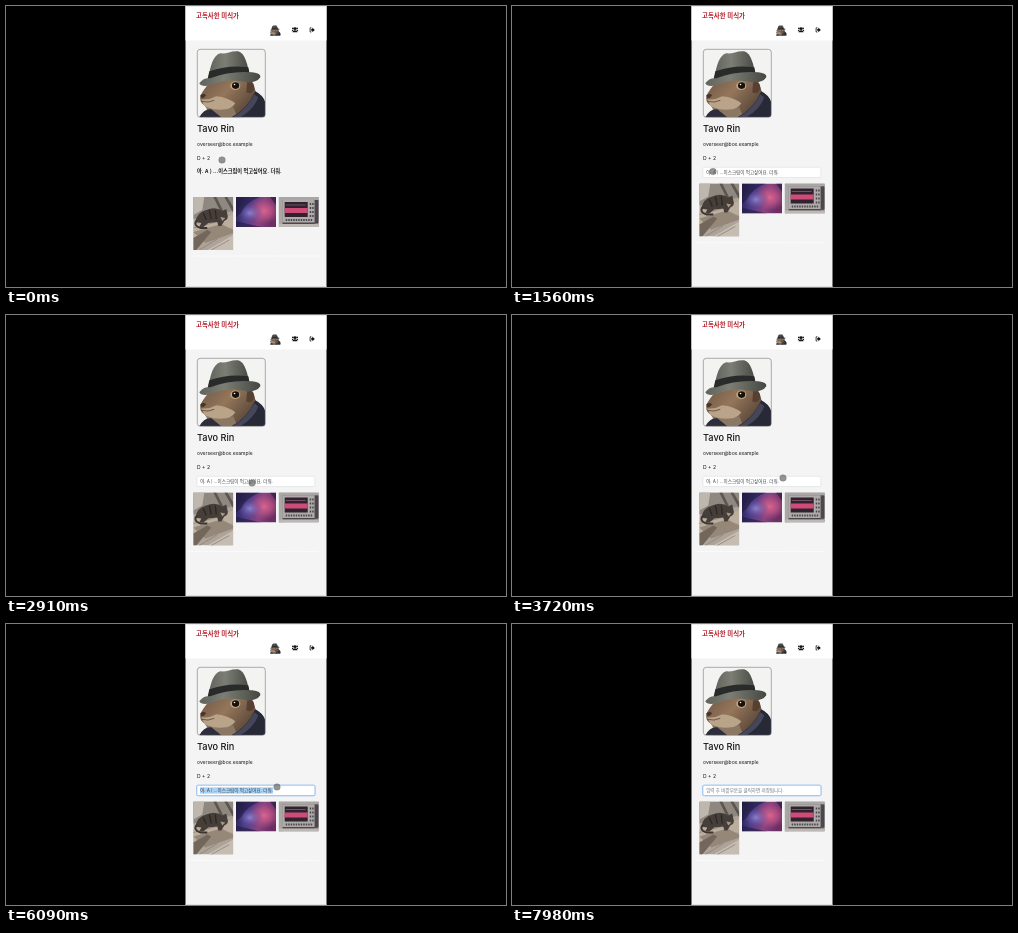
Recreate the animation shown at these times as an HTML page. Size 500 px wide and 281 px high, loop 8 s.

```html
<!DOCTYPE html>
<html lang="ko">
<head>
<meta charset="utf-8">
<title>Profile editing</title>
<style>
  html, body { margin: 0; width: 100%; height: 100%; overflow: hidden; background: #000; }
  svg { display: block; width: 100vw; height: 100vh; }
  text { font-family: Inter, "Noto Sans CJK KR", "Noto Sans CJK", sans-serif; fill: #151515; }
  .ko { font-family: "Noto Sans CJK KR", "Noto Sans CJK", sans-serif; }
  .field { font-size: 4.55px; fill: #3c4248; }
</style>
</head>
<body>
<svg viewBox="0 0 500 281">
  <defs>
    <clipPath id="portraitClip"><rect width="68" height="68" rx="3"/></clipPath>
    <clipPath id="tall"><rect width="40" height="53"/></clipPath>
    <clipPath id="wide"><rect width="40" height="30"/></clipPath>
    <linearGradient id="felt">
      <stop stop-color="#60635b"/><stop offset=".4" stop-color="#7c7e75"/><stop offset="1" stop-color="#454841"/>
    </linearGradient>
    <linearGradient id="fur" x2="1" y2=".6">
      <stop stop-color="#6f5645"/><stop offset=".5" stop-color="#94765a"/><stop offset="1" stop-color="#574538"/>
    </linearGradient>
    <linearGradient id="night" x2="1" y2=".2">
      <stop stop-color="#231d47"/><stop offset=".35" stop-color="#4a3c86"/>
      <stop offset=".7" stop-color="#8a4480"/><stop offset="1" stop-color="#6b2f66"/>
    </linearGradient>
    <radialGradient id="smoke">
      <stop stop-color="#d9648f"/><stop offset=".5" stop-color="#bd5486" stop-opacity=".75"/>
      <stop offset="1" stop-color="#b04d81" stop-opacity="0"/>
    </radialGradient>
    <radialGradient id="haze">
      <stop stop-color="#8b80cb"/><stop offset="1" stop-color="#594aa0" stop-opacity="0"/>
    </radialGradient>
    <g id="hat">
      <path d="M11 30C13 16 16 6 23 4C29 5 34 1 41 2C48 4 50 15 53 28Z" fill="url(#felt)"/>
      <path d="M12 22Q32 15 51 18L53 28Q32 22 10 31Z" fill="#292b2a"/>
      <path d="M2 34Q6 28 13 29Q34 21 55 23Q64 24 63 28Q59 34 49 33Q30 28 13 36Q4 38 2 34Z" fill="url(#felt)"/>
    </g>
    <g id="squirrel">
      <path d="M13 33Q31 25 54 31Q61 43 58 55L46 68H9Q12 61 7 56Q2 53 3 47Q6 40 13 33Z" fill="url(#fur)"/>
      <path d="M4 50Q12 51 19 47Q30 48 38 54Q34 61 22 62Q12 61 7 56Z" fill="#b9a389"/>
      <path d="M10 58Q22 63 36 58L40 68H9Z" fill="#8b7864"/>
      <path d="M50 32Q57 31 57 39Q55 46 49 43Z" fill="#574032"/>
      <ellipse cx="38" cy="36.5" rx="5" ry="4.3" fill="#c3a67f"/>
      <ellipse cx="38.3" cy="36.3" rx="3.6" ry="3.3" fill="#17110e"/>
      <circle cx="37.2" cy="35.2" r=".8" fill="#fff"/>
      <path d="M3 46Q6 43 9 46Q7 49 4 49Z" fill="#49352d"/>
      <path d="M4 52Q11 54 17 51" fill="none" stroke="#5b4335" stroke-width=".8"/>
      <path d="M58 42Q66 46 68 53V68H34Q50 60 58 42Z" fill="#272937"/>
      <path d="M57 45Q50 59 36 68H43Q57 60 61 48Z" fill="#45465a"/>
      <path d="M2 68Q7 59 14 60L24 68Z" fill="#2d2d3c"/>
      <use href="#hat"/>
    </g>
  </defs>

  <rect width="500" height="281"/>
  <rect x="179.5" width="141" height="281" fill="#f4f4f4"/>
  <rect x="179.5" width="141" height="34.5" fill="#fff"/>
  <path d="M179.5 .3H320.5M179.5 280.5H320.5" stroke="#d5d5d5" stroke-width=".6"/>

  <text class="ko" x="190" y="11.9" font-size="6.4" font-weight="700" style="fill:#b51f2c">고독사한 미식가</text>
  <g transform="translate(263.8 19) scale(.155)">
    <path d="M2 68L16 38H54L68 56V68Z" fill="#292726"/>
    <use href="#squirrel" opacity=".85"/>
    <path d="M11 30C13 16 16 6 23 4Q42-2 53 28L63 29L49 33L2 36Z" opacity=".45"/>
  </g>
  <g fill="#111">
    <circle cx="289" cy="22.7" r="1.4"/>
    <circle cx="286.9" cy="22.3" r=".9"/><circle cx="291.1" cy="22.3" r=".9"/>
    <path d="M286.6 26.3Q286.6 24.2 289 24.2T291.4 26.3Z"/>
    <path d="M285.7 25.2Q285.7 23.4 287.6 23.4L286.8 25.2ZM292.3 25.2Q292.3 23.4 290.4 23.4L291.2 25.2Z"/>
    <path d="M305.2 23H306.3V21.6L308.8 23.9L306.3 26.2V24.8H305.2Z"/>
    <path d="M305.4 21.8H304.1V26H305.4" fill="none" stroke="#111" stroke-width=".8"/>
  </g>

  <g transform="translate(191.3 43.3)">
    <g clip-path="url(#portraitClip)">
      <rect width="68" height="68" fill="#f3f3f2"/>
      <use href="#squirrel"/>
    </g>
    <rect width="68" height="68" rx="3" fill="none" stroke="#777" stroke-width=".6"/>
  </g>

  <text x="191" y="126" font-size="9.2" font-weight="500">Tavo Rin</text>
  <text x="191" y="140" font-size="5">overseer@box.example</text>
  <text x="191" y="153.8" font-size="5.1">D + 2</text>

  <text id="intro" class="ko" x="191" y="167.3" font-size="5.2" font-weight="700">아. A ) ...이스크림이 먹고싶어요. 더워.</text>

  <g id="editor">
    <rect id="glow" x="190.7" y="161.1" width="118.4" height="10.7" rx="1.6" fill="none" stroke="#c3dcf8" stroke-width="1.4"/>
    <rect id="box" x="190.9" y="161.3" width="118" height="10.3" rx="1.4" fill="#fff" stroke-width=".5"/>
    <rect id="selection" x="194" y="163.4" width="73" height="6.2" fill="#a9d1f3"/>
    <text id="value" class="ko field" x="194.2" y="168.3">아. A ) ...이스크림이 먹고싶어요. 더워.</text>
    <text id="hint" class="ko field" x="194.2" y="168.3" style="fill:#6c757d">입력 후 바깥부분을 클릭하면 저장됩니다.</text>
    <path id="spelling" d="M200.6 169.3H206M211 169.3H232.4" stroke="#d6453f" stroke-width=".6" stroke-dasharray=".8 .4"/>
    <path id="caret" d="M194 163.6V169.4" stroke="#222" stroke-width=".5"/>
  </g>

  <g id="gallery">
    <g transform="translate(187.3 191)" clip-path="url(#tall)">
      <rect width="40" height="53" fill="#aea398"/>
      <path d="M0 0H40V14L0 22Z" fill="#8f8881"/>
      <path d="M0 0H11L9 13L0 18Z" fill="#bdb7ae"/>
      <path d="M20 0H23L30 14H27ZM31 0H34L40 10V16Z" fill="#5d554f"/>
      <path d="M0 28L40 18V30L0 42Z" fill="#bcae9f"/>
      <path d="M0 35L28 27L40 33V36L12 46Z" fill="#968879"/>
      <path d="M0 41L14 33L18 35L3 53H0Z" fill="#73665b"/>
      <path d="M14 53L40 38V53Z" fill="#c6bdb2"/>
      <path d="M6 53L24 42M18 53L36 43M0 31L34 22" stroke="#8f8276" stroke-width=".8"/>
      <path d="M2 25Q4 15 13 13Q22 9 29 14L33 12L34 17Q36 22 31 24L28 29H25L24 25L15 26L10 30H6L8 26Z" fill="#463f39"/>
      <path d="M10 16L13 23M16 13L18 22M22 13L23 22" stroke="#2b2724" stroke-width="1.3"/>
      <path d="M4 23Q-1 28 7 31H14" fill="none" stroke="#3c3632" stroke-width="1.8"/>
      <path d="M27 20L32 21L29 24Z" fill="#a99887"/>
    </g>
    <g transform="translate(230 191)" clip-path="url(#wide)">
      <rect width="40" height="30" fill="url(#night)"/>
      <ellipse cx="28" cy="14" rx="16" ry="13" fill="url(#smoke)"/>
      <ellipse cx="14" cy="16" rx="13" ry="10" fill="url(#haze)"/>
      <path d="M0 0H24Q10 5 5 16L0 20ZM0 30V24Q16 28 26 30ZM34 0H40V8Z" fill="#211a3e" opacity=".6"/>
    </g>
    <g transform="translate(272.7 191)" clip-path="url(#wide)">
      <rect width="40" height="30" fill="#767173"/>
      <path d="M0 0H40V3H0ZM0 3H4V30H0Z" fill="#aaa6a4"/>
      <rect x="4" y="3" width="32" height="23" rx="1" fill="#b0abab"/>
      <rect x="6" y="5" width="23" height="15" fill="#30232f"/>
      <path d="M6 11H29V16H6Z" fill="#cf4c78"/>
      <path d="M7 8H27" stroke="#8c5972" stroke-width=".8"/>
      <path d="M31 7H35M31 11H35M31 15H35M31 19H35M7 23H34" stroke="#4c474b" stroke-width="1.8" stroke-dasharray="1.5 1"/>
      <path d="M36 3H40V26H36ZM4 25.5H36V27H4Z" fill="#4b474b"/>
      <path d="M0 27H40V30H0Z" fill="#bdb8b4"/>
    </g>
    <path d="M183 250H313" stroke="#fff" stroke-width=".8" stroke-dasharray="1.5 1"/>
  </g>

  <circle id="pointer" r="3.3" fill="#666" fill-opacity=".7" stroke="#444" stroke-opacity=".6" stroke-width=".4"/>
</svg>
<script>
const LOOP = 8000;
const OPEN = 600, FOCUS = 3750, SELECT = 5300, CLEAR = 7350;
const $ = id => document.getElementById(id);
const show = (id, visible) => $(id).style.display = visible ? "" : "none";

// Pointer stops: time, x, y
const stops = [
  [0, 216, 154], [120, 216, 154], [500, 217, 167], [950, 217, 167],
  [1560, 201, 165.5], [1740, 184, 166], [1950, 184, 166],
  [2910, 246, 168], [3500, 271, 163], [LOOP, 271, 163]
];

function pointerAt(t) {
  const i = stops.findIndex(stop => stop[0] > t);
  const [t0, x0, y0] = stops[i - 1], [t1, x1, y1] = stops[i];
  const p = (t - t0) / (t1 - t0), eased = p * p * (3 - 2 * p);
  return [x0 + (x1 - x0) * eased, y0 + (y1 - y0) * eased];
}

function draw(now) {
  const t = now % LOOP;
  const open = t >= OPEN, focused = t >= FOCUS, cleared = t >= CLEAR;
  const selected = t >= SELECT && !cleared;

  show("intro", !open);
  show("editor", open);
  show("glow", focused);
  show("selection", selected);
  show("value", !cleared);
  show("hint", cleared);
  show("spelling", focused && t < SELECT);
  show("caret", focused && !selected && t % 1060 < 530);
  show("pointer", !cleared);
  $("box").setAttribute("stroke", focused ? "#5a9dea" : "#d3d6d9");
  $("gallery").setAttribute("transform", `translate(0 ${open ? -13.5 : 0})`);
  $("pointer").setAttribute("transform", `translate(${pointerAt(t)})`);
  requestAnimationFrame(() => draw(performance.now()));
}
draw(0);
</script>
</body>
</html>
```
